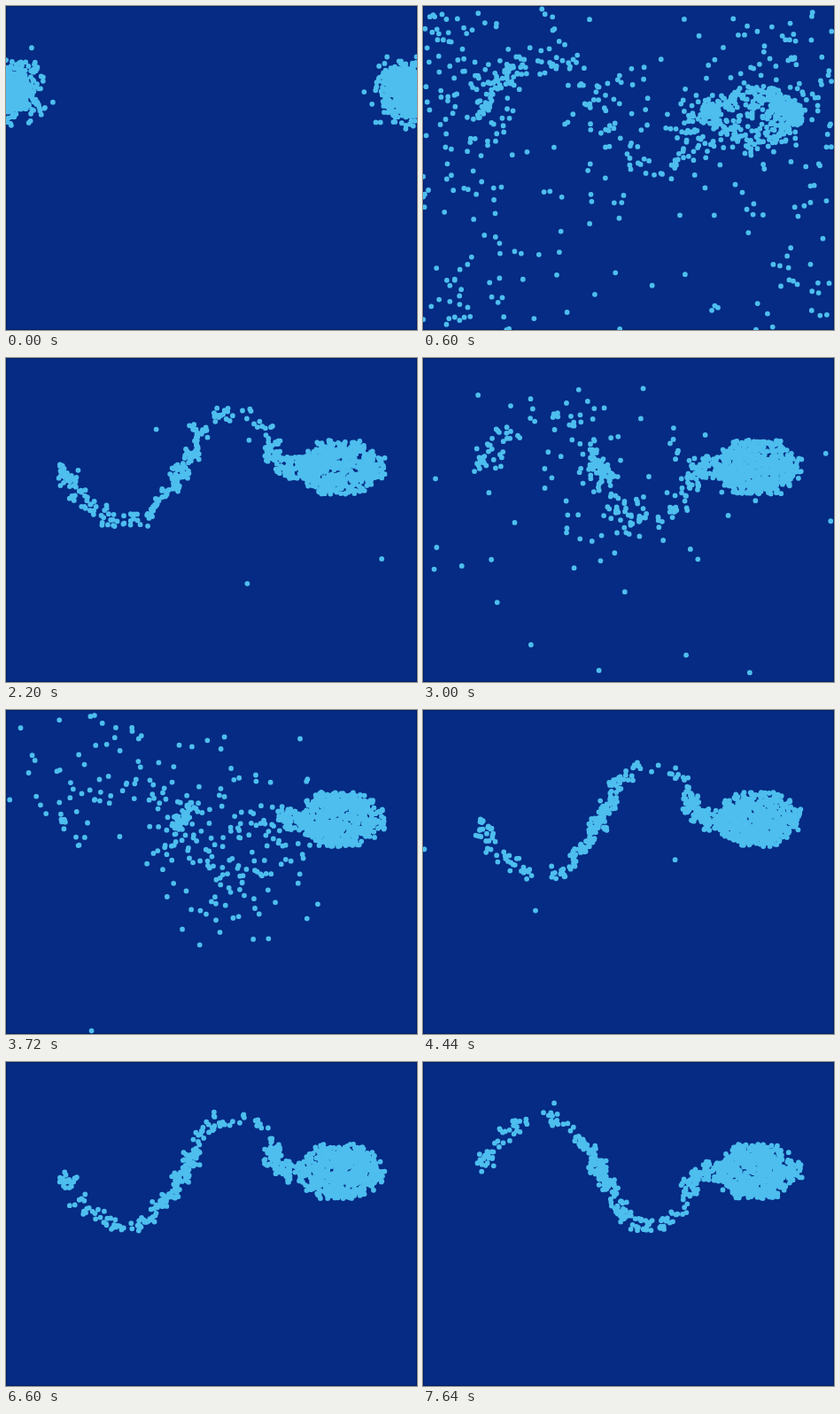
An HTML page with a canvas for the animation above (7680 ms loop, 464 by 366 pixels).

```html
<!DOCTYPE html>
<html lang="en">
<head>
<meta charset="utf-8">
<title>Swarm</title>
<style>
  html, body { margin: 0; width: 100%; height: 100%; overflow: hidden; background: #052b84; }
  canvas { display: block; }
</style>
</head>
<body>
<canvas id="stage" width="464" height="366"></canvas>
<script>
const W = 464, H = 366, STEP = 40, STEPS = 192;
const GRID = 40, CW = W / GRID, CH = H / GRID;
const COUNT = 930, HEAD_COUNT = 600, RADIUS = 2.9;
const FIRST_FLIP = 40, FLIP_EVERY = 26;

let seed = 20731;
function rand() {
  seed = (seed + 0x6d2b79f5) | 0;
  let t = Math.imul(seed ^ (seed >>> 15), 1 | seed);
  t = (t + Math.imul(t ^ (t >>> 7), 61 | t)) ^ t;
  return ((t ^ (t >>> 14)) >>> 0) / 4294967296;
}
const gauss = () => Math.sqrt(-2 * Math.log(1 - rand())) * Math.cos(2 * Math.PI * rand());
const wrap = (v, size) => ((v % size) + size) % size;

// A shape is a set of grid cells; each span is [column, top row, bottom row].
function makeShape(spans) {
  const filled = new Uint8Array(GRID * GRID), cells = [];
  for (const [col, top, bottom] of spans) {
    for (let row = top; row <= bottom; row++) {
      filled[row * GRID + col] = 1;
      cells.push([col, row]);
    }
  }
  const at = (x, y) => filled[Math.floor(y / CH) * GRID + Math.floor(x / CW)] === 1;
  const inset = 1.3;
  return {
    cells,
    has: (x, y) => at(x - inset, y - inset) && at(x + inset, y - inset) &&
                   at(x - inset, y + inset) && at(x + inset, y + inset)
  };
}

const tailTop = [11, 9, 8, 7, 6, 6, 6, 6, 6, 7, 9, 10, 12, 14, 17, 18, 19, 19, 19, 18, 14, 13, 12];
const tailBottom = [13, 12, 10, 9, 8, 7, 6, 7, 7, 9, 10, 13, 15, 18, 19, 20, 20, 20, 20, 19, 18, 16, 14];
const headReach = [1, 2, 3, 3, 3, 3, 3, 2, 1];
const tailSpans = tailTop.map((top, i) => [i + 5, top, tailBottom[i]]);
const head = makeShape(headReach.map((r, i) => [i + 28, 13 - r, 13 + r]));
const tails = [
  makeShape(tailSpans),
  makeShape(tailSpans.map(([col, top, bottom]) => [col, 26 - bottom, 26 - top]))
];

// Best of a few random cells, so dots mostly settle close by.
function pickTarget(shape, p, tries) {
  let best = null, bestDist = Infinity;
  for (let i = 0; i < tries; i++) {
    const [col, row] = shape.cells[Math.floor(rand() * shape.cells.length)];
    const x = (col + 0.15 + 0.7 * rand()) * CW, y = (row + 0.15 + 0.7 * rand()) * CH;
    const dist = Math.hypot(x - p.x, y - p.y);
    if (dist < bestDist) { bestDist = dist; best = { x, y }; }
  }
  return best;
}

function release(p, min, spread, lateShare) {
  p.free = true;
  p.target = null;
  p.roam = min + spread * rand() + (rand() < lateShare ? 8 + 12 * rand() : 0);
}

function creep(p, shape) {
  for (let i = 0; i < 3; i++) {
    const x = p.x + 4 * gauss(), y = p.y + 4 * gauss();
    if (shape.has(x, y)) { p.x = x; p.y = y; return; }
  }
}

function roam(p, shape) {
  if (p.roam-- > 0) {
    p.x = wrap(p.x + 25 * gauss(), W);
    p.y = wrap(p.y + 25 * gauss(), H);
  } else {
    p.target = p.target || pickTarget(shape, p, 3);
    p.x += (p.target.x - p.x) * 0.55 + 2 * gauss();
    p.y += (p.target.y - p.y) * 0.55 + 2 * gauss();
  }
  if (shape.has(p.x, p.y)) p.free = false;
}

function simulate() {
  const dots = Array.from({ length: COUNT }, (_, i) => {
    const p = {
      isHead: i < HEAD_COUNT,
      x: wrap(461 + 17 * gauss(), W),
      y: 96 + 15 * gauss()
    };
    release(p, 6, 14, 0.02);
    return p;
  });
  const poses = [];
  for (let k = 0; k < STEPS; k++) {
    const phase = Math.floor((k - FIRST_FLIP) / FLIP_EVERY) + 1;
    const tail = tails[k < FIRST_FLIP ? 0 : phase % 2];
    const pose = new Float32Array(COUNT * 2);
    dots.forEach((p, i) => {
      const shape = p.isHead ? head : tail;
      if (k > 0) {
        if (!p.free && !shape.has(p.x, p.y)) release(p, 5, 5, 0.02);
        if (p.free) roam(p, shape); else creep(p, shape);
      }
      pose[2 * i] = p.x;
      pose[2 * i + 1] = p.y;
    });
    poses.push(pose);
  }
  return poses;
}

const poses = simulate();
const ctx = document.getElementById("stage").getContext("2d");
let shown = -1;

function draw(pose) {
  ctx.fillStyle = "#052b84";
  ctx.fillRect(0, 0, W, H);
  ctx.strokeStyle = "rgba(0, 15, 60, 0.4)";
  ctx.strokeRect(0.5, 0.5, W - 1, H - 1);
  ctx.fillStyle = "#4dbeee";
  ctx.beginPath();
  for (let i = 0; i < pose.length; i += 2) {
    ctx.moveTo(pose[i] + RADIUS, pose[i + 1]);
    ctx.arc(pose[i], pose[i + 1], RADIUS, 0, 2 * Math.PI);
  }
  ctx.fill();
}

const start = performance.now();
function tick() {
  const k = Math.floor(Math.max(0, performance.now() - start) / STEP) % STEPS;
  if (k !== shown) draw(poses[shown = k]);
  requestAnimationFrame(tick);
}
tick();
</script>
</body>
</html>
```
